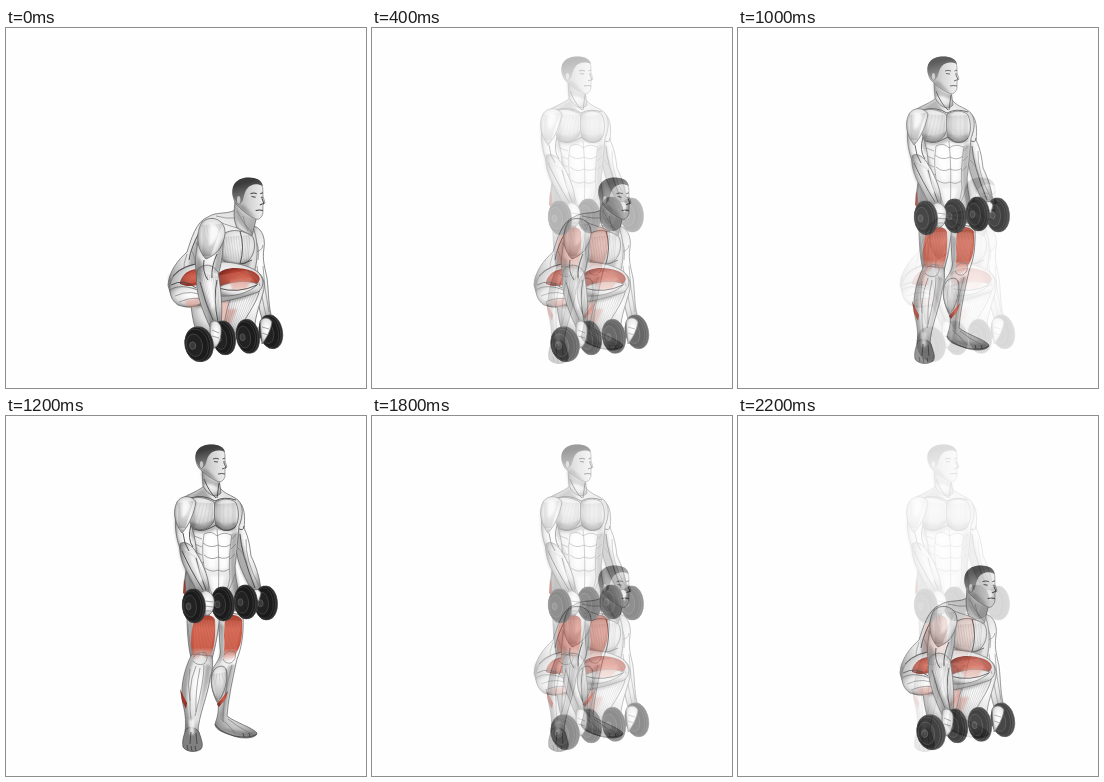
Animation of 360x360 px, one loop 2.4 s. Source, as an HTML page:

```html
<!DOCTYPE html>
<html lang="en">
<head>
<meta charset="utf-8">
<title>Dumbbell squat</title>
<style>
  html, body { margin: 0; width: 100%; height: 100%; overflow: hidden; background: #fefefe; }
  svg { display: block; width: 100vw; height: 100vh; }
  .m { fill: url(#muscle); stroke: #666; stroke-width: .75; }
  .r { fill: url(#red); }
  .q { fill: url(#quad); }
  .p { fill: #d98a7c; opacity: .5; filter: url(#soft); }
  .l { fill: none; stroke: #777; stroke-width: .65; }
  .d { fill: none; stroke: #444; stroke-width: .9; }
  .s { fill: #555; opacity: .4; filter: url(#soft); }
  .h { fill: #fff; opacity: .8; filter: url(#soft); }
  .fan { fill: none; stroke: #555; stroke-width: .4; opacity: .55; }
  .fan.w { stroke: #f3b5a6; opacity: .5; }
</style>
</head>
<body>
<svg viewBox="0 0 360 360">
  <defs>
    <filter id="soft" x="-30%" y="-30%" width="160%" height="160%"><feGaussianBlur stdDeviation="1.300"/></filter>
    <radialGradient id="muscle" cx=".56" cy=".42" r=".64">
      <stop offset=".2" stop-color="#fbfbfb"/>
      <stop offset=".65" stop-color="#e0e0e0"/>
      <stop offset="1" stop-color="#8f8f8f"/>
    </radialGradient>
    <radialGradient id="red" cx=".6" r=".65">
      <stop offset="0" stop-color="#cf5a46"/>
      <stop offset=".55" stop-color="#b34132"/>
      <stop offset="1" stop-color="#6f241c"/>
    </radialGradient>
    <linearGradient id="quad" x2="0" y2="1">
      <stop offset="0" stop-color="#a8402f"/>
      <stop offset=".3" stop-color="#cf5f4b"/>
      <stop offset=".72" stop-color="#c4523f"/>
      <stop offset="1" stop-color="#d98372" stop-opacity="0"/>
    </linearGradient>
    <linearGradient id="skin">
      <stop offset="0" stop-color="#999"/>
      <stop offset=".5" stop-color="#d2d2d2"/>
      <stop offset="1" stop-color="#f2f2f2"/>
    </linearGradient>
    <linearGradient id="hair" x2=".3" y2="1">
      <stop offset=".3" stop-color="#3c3c3c"/>
      <stop offset="1" stop-color="#888"/>
    </linearGradient>
    <g id="head">
      <path fill="url(#skin)" stroke="#666" stroke-width=".6" d="M190 42C190 33 197 29 205 29C214 29 219 33 219 40L219 45L221 51L219 53L219 60C218 65 214 67 211 65C204 62 199 58 196 55C192 52 190 48 190 42Z"/>
      <path class="s" d="M196 53C203 52 205 59 213 65C206 64 199 59 196 55Z"/>
      <path fill="url(#hair)" d="M190 46C187 34 195 28.500 205 28.500C213 28.500 218 31 219 36C212 33 207 35 204 38C201 41 201 45 199 50L194 51Z"/>
      <ellipse cx="195.500" cy="48.500" rx="2.200" ry="3.800" fill="#c4c4c4" stroke="#555" stroke-width=".6"/>
      <path class="d" d="M207 43Q210 41.500 213 43M216.500 43L219 42M208 45.500L212 46M217 46L219 46M218 47L220 51.500L216 53M212 58Q216 57 219 58"/>
    </g>
    <g id="disc">
      <ellipse cx="2" rx="10.500" ry="17" fill="#2b2b2b" stroke="#484848" stroke-width=".6"/>
      <ellipse rx="10.500" ry="17" fill="#1b1b1b" stroke="#4a4a4a" stroke-width=".6"/>
      <ellipse cx="-1.200" rx="9.500" ry="15.500" fill="#1b1b1b" stroke="#454545" stroke-width=".6"/>
      <ellipse cx="-3" rx="6.500" ry="11" fill="#222" stroke="#484848" stroke-width=".7"/>
      <ellipse cx="-4.500" rx="2.500" ry="3.500" fill="#3a3a3a" stroke="#666" stroke-width=".6"/>
    </g>
  </defs>

  <rect width="360" height="360" fill="#fefefe"/>
  <g id="squat">
    <path class="m" d="M246 198C254 198 260 208 258 220C256 232 259 240 261 250C263 265 262 280 267 293L258 297C252 280 250 262 248 245C243 230 240 215 246 198Z"/>
    <path class="l" d="M247 224Q256 224 257 217M251 238Q254 262 261 292M257 238Q258 260 263 284M249 212Q254 218 252 232"/>
    <path class="m" d="M230 181C224 187 210 183 202 189C190 193 185 212 181 224C172 232 163 243 162 257C166 276 180 282 194 278L232 268L248 245C253 230 252 208 246 198Z"/>
    <path class="m" d="M229 173C228 184 227 191 231 200L246 208L250 191Z"/>
    <path class="s" d="M230 178Q238 188 250 191L246 206Q234 199 230 190Z"/>
    <path class="l" d="M231 183Q236 194 246 205M237 188Q239 198 242 203M205 190Q219 197 231 200M210 188Q221 191 229 190"/>
    <path class="m" d="M214 209C223 199 238 202 247 209C251 219 247 230 240 235C229 239 218 236 212 227Z"/>
    <path class="fan" data-fan="216 209 244 207 214 229 242 234" data-n="17"/>
    <path class="s" d="M212 226Q224 240 245 232L242 242L211 242ZM194 204Q184 220 183 238L194 242L192 226ZM163 246Q161 270 179 278L170 263Z"/>
    <path class="d" d="M234 203Q239 219 234 236M218 235Q230 240 246 232M194 203Q185 219 183 232"/>
    <path class="l" d="M190 214Q194 224 191 238M185 222Q191 230 188 240M181 226Q177 236 178 244"/>

    <path class="m" d="M248 242C258 246 260 256 257 265C252 282 248 292 249 304L234 306C234 288 238 268 240 255Z"/>
    <path class="m" d="M186 262C183 276 187 292 190 304L216 309C223 297 239 280 244 263Z"/>
    <path class="p" d="M212 276C220 266 232 263 242 265C234 280 224 293 216 296Z"/>
    <path class="m" d="M226 266C235 258 251 253 254 261C250 279 238 288 233 306L216 309C219 290 221 279 226 266Z"/>
    <path class="p" d="M221 281L231 281L224 296L218 297Z"/>
    <path class="fan" data-fan="226 266 252 261 218 306 232 306" data-n="10"/>
    <path class="m" d="M172 243C190 231 228 231 247 241C258 246 260 258 252 264C237 270 205 277 180 279C163 275 158 256 172 243Z"/>
    <path class="s" d="M208 262Q230 269 252 262Q238 276 210 274ZM188 266L212 262L208 278L190 280Z"/>
    <path class="m" d="M164 262C174 255 191 260 203 268C196 278 183 281 172 277C166 273 164 267 164 262Z"/>
    <path class="p" d="M178 273L196 269L192 279L182 279Z"/>
    <path class="r" d="M174 256C174 249 181 242 190 241L197 254C190 259 181 259 174 256Z"/>
    <path class="r" d="M211 247C216 239 233 238 246 243C255 247 256 253 250 256C241 261 222 261 211 259Z"/>
    <path class="m" d="M213 259C222 254 240 251 252 256C243 266 226 269 211 268Z"/>
    <path class="p" d="M224 252L246 250L241 261L226 262Z"/>
    <path class="fan w" data-fan="212 248 212 258 241 243 250 255" data-n="10"/>
    <path class="fan w" data-fan="175 250 175 256 190 242 195 253" data-n="8"/>
    <path class="d" d="M167 248Q180 235 196 236M165 257Q178 250 190 260M212 260Q232 266 251 257"/>
    <path class="l" d="M169 268Q186 260 201 270M173 274Q190 267 199 273M240 243Q252 248 254 258"/>

    <path class="m" d="M193 210C189 225 188 240 192 252L211 251C215 238 218 222 217 207Z"/>
    <path class="m" d="M192 241C187 258 195 279 204 299L215 299C217 280 215 261 212 244C207 236 198 235 192 241Z"/>
    <path class="m" d="M196 194C206 186 220 192 219 206C217 220 210 227 200 231C191 222 189 206 196 194Z"/>
    <path class="fan" data-fan="197 197 216 196 197 228 204 228" data-n="11"/>
    <path class="fan" data-fan="193 245 211 248 205 294 214 296" data-n="9"/>
    <path class="d" d="M198 232Q196 244 202 252M211 226Q205 239 206 250M194 254Q199 275 207 292M211 252Q207 270 212 294"/>
    <path class="s" d="M192 228L197 236L196 257L211 296L204 298C196 281 188 260 192 228ZM218 208L214 240L208 246L210 226Z"/>
    <path class="h" d="M204 196Q212 196 213 205Q208 216 203 218ZM201 253L206 252L209 278L206 282Z"/>
    <use href="#head" transform="translate(226 149) scale(1.030 1.120) translate(-189 -28)"/>

    <path stroke="#333" stroke-width="6" d="M193 316L218 311M241 309L265 305"/>
    <use href="#disc" transform="translate(217 310) rotate(-10)"/>
    <use href="#disc" transform="translate(264 304) rotate(-12)"/>
    <path class="m" d="M204 295C208 291 213 293 215 299C216 309 213 318 208 320L204 313Z"/>
    <path class="m" d="M254 293C258 288 264 290 266 294C265 302 260 311 256 316Z"/>
    <path class="l" d="M206 302L213 305M206 308L213 310M256 299L263 301M256 305L262 307"/>
    <use href="#disc" transform="translate(192 316.500) rotate(-12) scale(1.220 1.030)"/>
    <use href="#disc" transform="translate(241 308.500) rotate(-10)"/>
  </g>

  <g id="stand" opacity="0">
    <rect width="360" height="360" fill="#fefefe"/>
    <path class="m" d="M230 84C240 88 239 104 238 112C243 122 244 132 245 140C250 150 254 162 255 175L247 178C241 164 233 152 231 138C227 128 227 112 228 100Z"/>
    <path class="s" d="M230 104L235 122L250 174L246 176Q232 154 231 138Z"/>
    <path class="d" d="M231 112Q238 116 238 110M234 118Q235 137 249 172"/>
    <path class="l" d="M240 123Q239 144 253 170M232 132Q238 137 241 148M233 88Q237 98 234 108"/>

    <path class="m" d="M212 195L237 199C238 220 235 233 231 243C228 256 224 275 222 290L221 300C230 307 246 311 251 317C251 323 235 323 228 320C218 317 209 314 209 308C212 300 213 293 212 288C206 278 203 262 207 252C211 246 216 240 214 232Z"/>
    <path class="m" d="M208 254C213 248 221 249 221 257C221 270 217 279 212 286C205 275 203 262 208 254Z"/>
    <path class="fan" data-fan="207 258 220 256 211 284 216 282" data-n="8"/>
    <path class="s" d="M212 206L218 210L218 240L210 252Q217 238 212 206ZM222 250L229 248L221 288L217 304L214 300Z"/>
    <path class="q" d="M219 201C226 197 234 200 236 204C237 220 235 229 231 236C228 244 221 248 217 244C218 235 219 228 218 220Z"/>
    <path class="fan w" data-fan="220 204 235 205 218 238 230 234" data-n="10"/>
    <path class="l" d="M218 239Q222 233 229 236Q231 243 225 247Q219 248 217 243M226 249Q217 280 217 306M220 253Q223 270 217 287M214 302Q222 308 229 317M222 303Q233 312 246 318"/>
    <path class="r" d="M211 288L222 275L220 282L213 291Z"/>
    <path class="s" d="M214 312Q232 315 250 317Q246 323 230 320Z"/>
    <path class="d" d="M209 308Q212 315 228 320Q244 323 251 318M237 317L238 321M243 317L244 321"/>

    <path class="m" d="M181 150C177 165 178 185 181 200C181 220 183 235 186 246L206 243C211 225 213 210 214 195L205 160Z"/>
    <path class="m" d="M186 238C177 255 174 275 177 288C180 300 180 308 179 316L192 317C192 300 202 280 204 262C207 252 207 246 206 240Z"/>
    <path class="s" d="M182 202L188 206L189 240Q180 262 181 288L183 314L180 312Q181 298 177 286Q175 258 186 240ZM200 248L205 250L203 264L192 302Z"/>
    <path class="q" d="M189 203C197 197 207 198 209 204C210 221 208 232 205 239C200 247 196 239 195 234C194 246 188 248 186 238C184 226 185 213 189 203Z"/>
    <path class="fan w" data-fan="189 204 209 204 188 238 204 237" data-n="12"/>
    <path class="l" d="M188 241Q192 235 200 237Q203 243 198 248Q191 250 187 245M190 250Q180 272 186 312M198 249Q198 266 189 300M184 253Q181 268 184 285M182 208Q183 226 186 235M194 252Q189 276 190 296"/>
    <path class="r" d="M174 273L181 287L180 293L176 285ZM178 163L181 173L180 180L177 177Z"/>
    <path d="M180 313C185 310 190 312 193 316C195 323 198 329 195 333C190 337 180 336 177 331C176 324 178 319 180 313Z" fill="#808080" stroke="#444" stroke-width=".7"/>
    <path class="h" d="M183 304L189 303L188 318L184 319Z"/>
    <path class="d" d="M181 329L182 334M185 330L186 335M189 330L190 335M185 316L184 328M190 317L191 328"/>

    <path class="m" d="M198 70C190 77 178 79 174 85L178 118C183 130 182 145 180 160C179 170 180 185 183 195L238 195C234 180 229 165 229 150C231 135 232 120 233 110C237 100 238 90 232 84C226 79 217 78 213 70Z"/>
    <path class="m" d="M196 54L197 70C203 81 211 82 215 77L213 64Z"/>
    <path class="s" d="M195 56C202 62 208 65 214 66L214 72C207 70 201 65 197 70ZM198 72L206 84L186 81Z"/>
    <path class="d" d="M198 63Q203 76 210 82M213 67L211 82M184 82Q198 78 209 85Q218 80 230 84"/>
    <path class="m" d="M182 84C190 79 200 82 208 86C211 95 209 108 203 111C194 117 184 112 182 104C179 96 180 89 182 84Z"/>
    <path class="m" d="M209 86C216 82 226 82 230 87C234 96 233 108 228 112C221 116 213 114 210 110C208 102 208 94 209 86Z"/>
    <path class="fan" data-fan="183 86 206 87 186 110 207 107" data-n="16"/>
    <path class="fan" data-fan="211 88 229 87 211 108 229 109" data-n="14"/>
    <path class="s" d="M182 105Q195 112 208 104Q218 112 230 106L230 114Q220 117 211 113Q196 121 183 113Z"/>
    <path class="d" d="M183 110Q193 118 204 112L210 109L217 114Q225 116 230 110"/>
    <path class="s" d="M179 113Q192 122 197 157L208 190L184 188Q179 167 183 150Q184 132 179 113ZM226 117L232 116L229 150L236 184L230 182Q221 160 226 117Z"/>
    <path class="h" d="M200 120L209 119L209 152L203 152ZM214 120L222 121L221 152L214 153ZM204 160L219 160L214 186L209 184Z"/>
    <path class="l" d="M211 113Q214 140 212 188M198 118Q206 114 211 120Q218 115 225 119M197 127Q204 133 212 129Q219 133 225 128M198 139Q205 145 212 141Q219 144 224 140M199 152Q206 157 212 154Q218 157 223 153M198 118Q194 141 201 163Q204 176 210 186M226 118Q222 144 224 161Q222 176 215 186"/>
    <path class="l" d="M183 118L196 123M184 126L196 131M185 134L196 139M185 143L198 147M230 118L226 123M230 128L225 133M229 138L224 143M182 158Q194 164 206 184M229 158Q225 173 216 184M182 172Q190 178 193 188"/>

    <path class="m" d="M170 100C168 112 171 125 175 135C178 145 182 148 189 150C192 140 190 122 184 106Z"/>
    <path class="m" d="M174 128C172 145 184 160 193 179L203 177C204 164 198 150 191 138C186 128 178 124 174 128Z"/>
    <path class="m" d="M171 86C176 78 187 80 190 86C188 97 184 108 176 117C169 108 166 96 171 86Z"/>
    <path class="fan" data-fan="172 87 187 85 173 112 179 112" data-n="10"/>
    <path class="fan" data-fan="175 132 190 140 194 175 202 174" data-n="9"/>
    <path class="d" d="M177 117Q178 128 183 135M185 109Q181 123 187 131M176 135Q184 153 197 174M190 142Q193 157 200 174"/>
    <path class="s" d="M169 92Q169 120 175 128Q177 148 198 178L193 179Q174 151 173 132Q167 114 169 92ZM189 92L188 126L184 118Z"/>
    <path class="h" d="M176 86Q183 83 184 89Q181 100 176 102ZM183 138L188 141L197 164L194 166Z"/>
    <use href="#head"/>

    <path stroke="#333" stroke-width="6" d="M187 190L217 187M237 186L260 187"/>
    <use href="#disc" transform="translate(216 188) rotate(-5)"/>
    <use href="#disc" transform="translate(259 187) rotate(-4)"/>
    <path class="m" d="M194 177C199 172 206 176 208 183C209 192 206 199 200 200C198 192 196 185 194 177Z"/>
    <path class="l" d="M199 185L207 186M199 190L207 191M200 195L205 195"/>
    <path class="m" d="M247 175Q252 171 255 177L253 185L249 184Z"/>
    <use href="#disc" transform="translate(187 190) rotate(-5)"/>
    <use href="#disc" transform="translate(239 186) rotate(-4)"/>
  </g>
</svg>
<script>
  const STEP = 200, HALF = 6;
  const stand = document.getElementById('stand');

  // Muscle fibres: lines spread evenly between two end segments.
  for (const path of document.querySelectorAll('[data-fan]')) {
    const [ax, ay, bx, by, cx, cy, dx, dy] = path.dataset.fan.split(' ').map(Number);
    const n = +path.dataset.n;
    let d = '';
    for (let i = 0; i <= n; i++) {
      const k = i / n;
      const mix = (a, b) => a + (b - a) * k;
      d += `M${mix(ax, bx)} ${mix(ay, by)}L${mix(cx, dx)} ${mix(cy, dy)}`;
    }
    path.setAttribute('d', d);
  }

  // Stepped cross-fade between the two poses.
  function draw() {
    const step = Math.floor(performance.now() / STEP) % (2 * HALF);
    stand.setAttribute('opacity', 1 - Math.abs(step - HALF) / HALF);
    requestAnimationFrame(draw);
  }
  draw();
</script>
</body>
</html>
```
